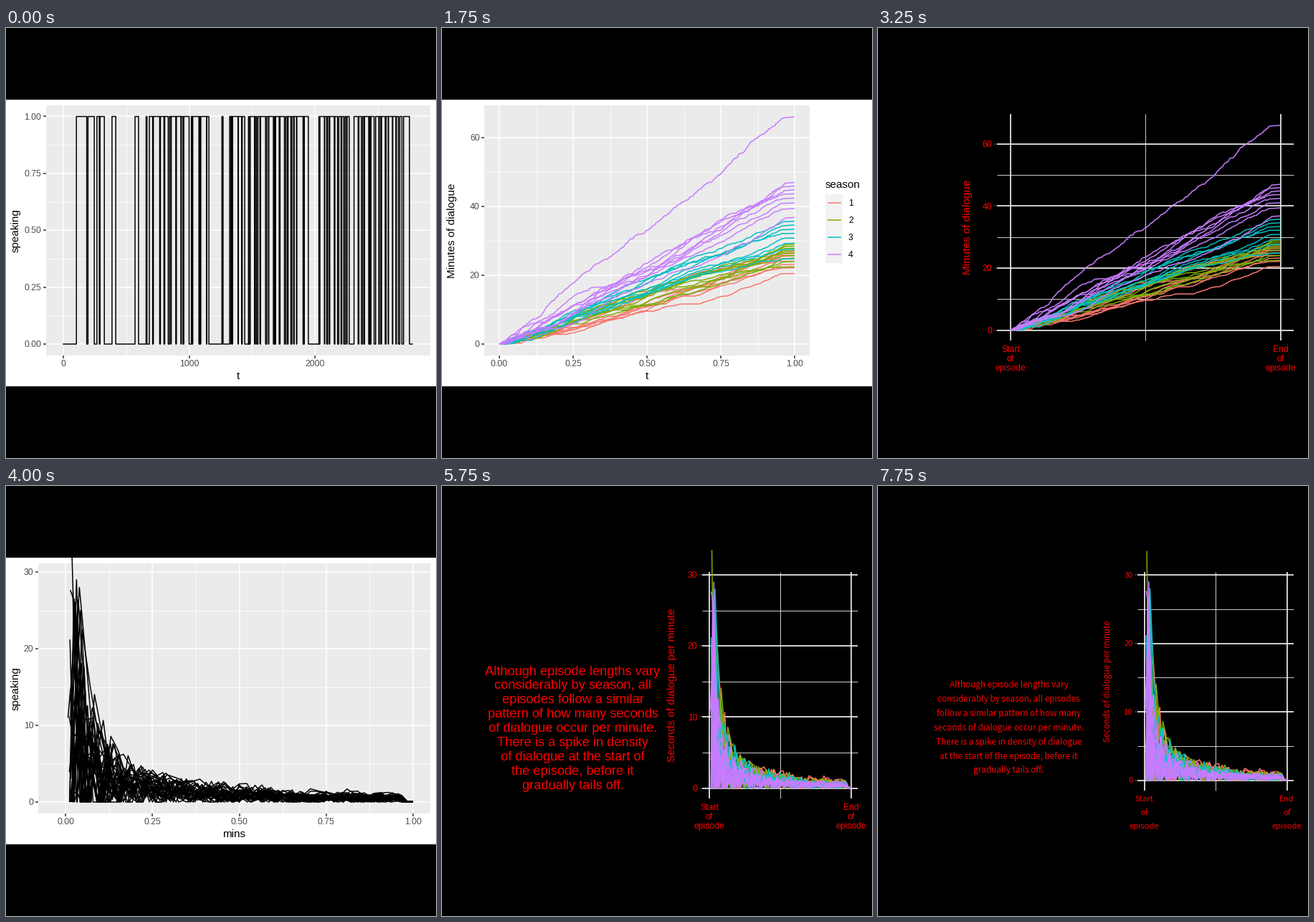
Write a matplotlib script that moves like this. It is 600x600 px and loops after 8 s.

```python
import numpy as np
import matplotlib.pyplot as plt
from matplotlib.animation import FuncAnimation
from matplotlib.patches import Rectangle

DPI = 100
STEP = 250
SANS = "Liberation Sans"
HUMAN = "Noto Sans CJK JP"
HUES = ["#F8766D", "#7CAE00", "#00BFC4", "#C77CFF"]
GREY, INK, TICK = "#EBEBEB", "#4D4D4D", "#333333"

fig = plt.figure(figsize=(6, 6), dpi=DPI, facecolor="black")
ax = fig.add_axes([0, 0, 1, 1])


def line(x, y, color, width, z=2):
    ax.plot(x, y, color=color, lw=width * 72 / DPI, zorder=z,
            solid_capstyle="butt", solid_joinstyle="round")


def rect(x0, y0, x1, y1, color, z=0):
    ax.add_patch(Rectangle((x0, y0), x1 - x0, y1 - y0, fc=color, lw=0, zorder=z))


def label(x, y, s, size, color="black", ha="center", font=SANS):
    ax.text(x, y + 0.35 * size, s, fontsize=size * 72 / DPI, color=color,
            ha=ha, va="baseline", family=font, zorder=9)


def side_label(x, y, s, size, color="black", font=SANS):
    ax.text(x, y, s, fontsize=size * 72 / DPI, color=color, rotation=90,
            ha="center", va="center", family=font, zorder=9)


def mids(p):
    return [(a + b) / 2 for a, b in zip(p, p[1:])]


def spread(start, step, names):
    return {start + step * i: s for i, s in enumerate(names)}


# ---- data -------------------------------------------------------------


def make_speech():
    """One episode: seconds, and whether someone is speaking in each."""
    rng = np.random.default_rng(5)
    t = np.arange(0, 2776)
    on = np.ones(len(t))
    n = 80
    u = (np.arange(n) + rng.uniform(0, 0.9, n)) / n
    starts = 125 + 2600 * u ** 0.8
    for a, w in zip(starts, 2 + rng.exponential(5, n)):
        on[(t >= a) & (t < a + w)] = 0
    # long silences
    for a, b in [(0, 104), (330, 387), (417, 570), (598, 658), (1157, 1261),
                 (1270, 1322), (1948, 2032), (2273, 2304), (2752, 2776)]:
        on[a:b] = 0
    return t, on


def make_episodes():
    """Season, then x and y of the running total and of the rate curve."""
    rng = np.random.default_rng(11)
    out = []
    # count, lengths and dialogue in minutes, busiest second minute
    for s, (count, short, long, low, high, peak) in enumerate([
            (8, 42, 56, 20.5, 27, 45), (9, 46, 62, 22.5, 29, 50),
            (8, 50, 78, 24.8, 35.7, 56), (9, 63, 98, 36.8, 48, 58)]):
        for e in range(count):
            f = e / (count - 1)
            n = round(short + (long - short) * f)
            total = low + (high - low) * f ** 0.7
            finale = s == 3 and e == count - 1
            if finale:
                n, total = 139, 66
            u = np.linspace(0, 1, n)
            pace = 1 + 0.25 * np.sin(2 * np.pi * (rng.uniform(0.5, 2.5) * u + rng.random()))
            q = (total * 15 / n * pace[:, None] + rng.normal(0, 5.5, (n, 4))
                 + rng.normal(0, 3, (n, 1)))
            q = np.clip(q, 0, 14.5)
            q[0] *= rng.choice([0, 0.3, 0.6])
            q[rng.integers(2, 9)] = 0
            q[rng.random(n) < 0.06] = 0
            q[int(n * 0.97):] *= 0.1
            if e == 0:
                q[1] = peak / 4
            if finale:
                q[0] = 11 / 4
            run = np.r_[0, np.cumsum(q)]
            m = np.arange(1, n + 1)
            out.append((s, np.linspace(0, 1, len(run)), run / run[-1] * total,
                        m / n, q.sum(1) / m))
    return out


SECONDS, SPEAKING = make_speech()
EPISODES = make_episodes()

# ---- chart parts ------------------------------------------------------


def curves(rate, x0, x1, y0, unit, black=False, only=None):
    """Draw each episode; unit is the height of 1 on the y axis."""
    for i, (s, ux, uy, rx, ry) in enumerate(EPISODES):
        if only is not None and i != only:
            continue
        x, y = (rx, ry) if rate else (ux, uy)
        line(x0 + x * (x1 - x0), y0 - y * unit,
             "black" if black else HUES[s], 1.5, 3)


def grey(box, xt, yt, xlab, ylab, extra=()):
    """White sheet with a grey panel; xt and yt map positions to labels."""
    l, t, r, b = box
    rect(0, 100, 600, 500, "white")
    rect(l, t, r, b, GREY, 1)
    xs, ys = list(xt), list(yt)
    for group, w in ((mids(xs) + list(extra), 0.75), (xs, 1.5)):
        for x in group:
            line([x, x], [t, b], "white", w)
    for group, w in ((mids(ys), 0.75), (ys, 1.5)):
        for y in group:
            line([l, r], [y, y], "white", w)
    for x, s in xt.items():
        line([x, x], [b, b + 4], TICK, 1.5)
        for i, part in enumerate(s.split()):
            label(x, b + 11 + 13.2 * i, part, 12.2, INK)
    for y, s in yt.items():
        line([l - 4, l], [y, y], TICK, 1.5)
        label(l - 6.5, y, s, 12.2, INK, "right")
    label((l + r) / 2, 484.5, xlab, 15.2)
    side_label(14, (t + b) / 2, ylab, 15.2)


def legend():
    label(535, 217.5, "season", 15.2, ha="left")
    rect(535, 232, 558.5, 327.5, "#F2F2F2", 1)
    for i, c in enumerate(HUES):
        y = 244 + 24 * i
        line([537.5, 556.5], [y, y], c, 1.5)
        label(567, y, str(i + 1), 12.2, ha="left")


def dark(left, x0, x1, y0, ytop, yt, ylab, ylab_x, bottom=436, font=SANS,
         tick=12.1, title=15.2, lead=13, first=448):
    """White grid with red words on black; yt lists labels from y0 up to ytop."""
    ys = list(np.linspace(y0, ytop, len(yt)))
    for group, w in ((mids(ys), 0.8), (ys, 1.6)):
        for y in group:
            line([left, 580], [y, y], "white", w)
    for x, w in (((x0 + x1) / 2, 0.8), (x0, 1.6), (x1, 1.6)):
        line([x, x], [120, bottom], "white", w)
    for y, s in zip(ys, yt):
        line([left - 4, left], [y, y], TICK, 1.5)
        label(left - 6.5, y, s, tick, "red", "right", font)
    for x, s in ((x0, "Start of episode"), (x1, "End of episode")):
        for i, part in enumerate(s.split()):
            label(x, first + lead * i, part, tick, "red", font=font)
    side_label(ylab_x, (120 + bottom) / 2, ylab, title, "red", font)


def wrap(text, width):
    rows = [""]
    for word in text.split():
        if rows[-1] and len(rows[-1]) + 1 + len(word) > width:
            rows.append(word)
        else:
            rows[-1] = (rows[-1] + " " + word).strip()
    return rows


NOTE = ("Although episode lengths vary considerably by season, all episodes "
        "follow a similar pattern of how many seconds of dialogue occur per "
        "minute. There is a spike in density of dialogue at the start of the "
        "episode, before it gradually tails off.")


def note(width, mid, size, font):
    rows = wrap(NOTE, width)
    for i, row in enumerate(rows):
        label(182.5, mid + 19.9 * (i - (len(rows) - 1) / 2), row, size, "red",
              font=font)


# ---- scenes -----------------------------------------------------------

MINUTES, RATE = "Minutes of dialogue", "Seconds of dialogue per minute"
QUARTERS = ["0.00", "0.25", "0.50", "0.75", "1.00"]
TENS = ["0", "10", "20", "30"]
TWENTIES = ["0", "20", "40", "60"]
THOUSANDS = ["0", "1000", "2000", "3000", "4000"]
UNIT = spread(83, 121.25, QUARTERS)
NARROW = spread(80, 103, QUARTERS)
ENDS = spread(67, 424.5, ["Start of episode", "End of episode"])
FULL = (59, 108, 592, 457)


def switching():
    grey((56, 108, 592, 457), spread(80, 175.5, THOUSANDS[:3]),
         spread(441, -79.4, QUARTERS), "t", "speaking", [519])
    ax.step(80 + SECONDS * 0.1755, 441 - 317.5 * SPEAKING, where="post",
            color="black", lw=1.5 * 72 / DPI, zorder=3)


def running():
    grey(FULL, UNIT, spread(441, -98.8, ["0", "500", "1000", "1500"]),
         "t", "speaking")
    total = np.cumsum(SPEAKING)
    line(83 + 485 * SECONDS / SECONDS[-1], 441 - 317.4 * total / total[-1],
         "black", 1.5, 3)


def all_running():
    grey(FULL, UNIT, spread(441, -80, THOUSANDS), "t", "speaking")
    curves(False, 83, 568, 441, 4.8, black=True)


def by_season(minutes):
    yt = spread(441, -96, TWENTIES) if minutes else spread(441, -80, THOUSANDS)
    grey((59, 108, 513, 457), NARROW, yt, "t", MINUTES if minutes else "speaking")
    curves(False, 80, 492, 441, 4.8)
    legend()


def named_ends():
    grey((45, 108, 513, 431), ENDS, spread(416, -88.6, TWENTIES), "t", MINUTES)
    curves(False, 67, 491.5, 416, 4.43)
    legend()


def blank():
    rect(0, 100, 600, 500, "white")


def bare():
    blank()
    curves(False, 67, 491.5, 416, 4.43)


def dark_running(grid=True, data=True):
    if grid:
        dark(166, 185, 561.5, 421.5, 161.8, TWENTIES, MINUTES, 125)
    if data:
        curves(False, 185, 561.5, 421.5, 4.328)


def rate_draft(only=None, color=False):
    right, x0, x1 = (513, 80, 492) if color else (592, 83, 568)
    grey((45, 108, right, 457), NARROW if color else UNIT,
         spread(441, -107, TENS), "mins", "speaking")
    curves(True, x0, x1, 441, 10.7, black=not color, only=only)
    if color:
        legend()


def rate_chart(ylab=RATE):
    grey((45, 108, 513, 431), ENDS, spread(416, -101.3, TENS), "mins", ylab)
    curves(True, 67, 491.5, 416, 10.13)
    legend()


def dark_rate(wide=False):
    left, x0, x1, tx = (166, 185, 561.5, 125) if wide else (363, 373, 570.5, 321)
    dark(left, x0, x1, 421.5, 124, TENS, RATE, tx)
    curves(True, x0, x1, 421.5, 9.917)


def with_note():
    dark_rate()
    note(29, 336.7, 18.3, SANS)


def small_note():
    dark_rate()
    note(22, 302, 11.7, HUMAN)


def final_chart():
    dark(362, 371.5, 570.5, 410.5, 124, TENS, RATE, 320.5, bottom=425,
         font=HUMAN, tick=11.2, title=11.5, lead=19, first=436)
    curves(True, 371.5, 570.5, 410.5, 9.55)


def narrow_final():
    final_chart()
    note(22, 302, 11.7, HUMAN)


def finish():
    final_chart()
    note(39, 336.7, 11.7, HUMAN)


SCENES = [
    (0, switching), (1000, running), (1250, all_running),
    (1500, lambda: by_season(False)), (1750, lambda: by_season(True)),
    (2000, named_ends), (2250, bare), (2500, blank),
    (2750, lambda: dark_running(grid=False)),
    (3000, lambda: dark_running(data=False)), (3250, dark_running),
    (3500, lambda: rate_draft(only=0)), (4000, rate_draft),
    (4250, lambda: rate_draft(color=True)), (4500, lambda: rate_chart("speaking")),
    (4750, rate_chart), (5000, lambda: dark_rate(True)), (5250, dark_rate),
    (5500, with_note), (6000, small_note), (6500, narrow_final), (7750, finish),
]


def draw(i):
    ax.clear()
    ax.set_xlim(0, 600)
    ax.set_ylim(600, 0)
    ax.axis("off")
    scene = [f for start, f in SCENES if start <= i * STEP][-1]
    scene()
    return []


anim = FuncAnimation(fig, draw, frames=8000 // STEP, interval=STEP,
                     init_func=lambda: draw(0), repeat=True, blit=False)
plt.show()
```
